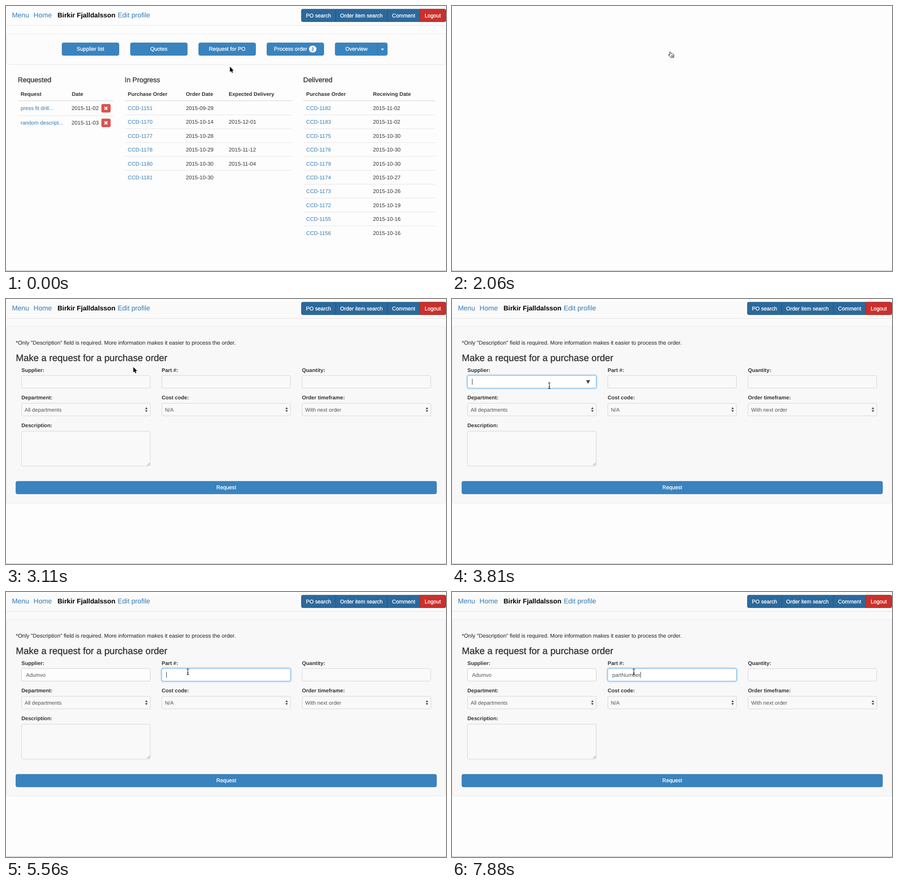
Write an HTML page that moves like this. It is 963 px wide and 581 px high and loops after 8 s.

```html
<!DOCTYPE html>
<html lang="en">
<head>
<meta charset="utf-8">
<title>Purchase order request</title>
<style>
  html, body { margin: 0; width: 100%; height: 100%; overflow: hidden; background: #fdfdfd; }
  svg { display: block; width: 100%; height: 100%; }
  text { font: 11.65px "Liberation Sans", Arial, sans-serif; fill: #333; text-rendering: geometricPrecision; white-space: pre; }
  .link { fill: #337ab7; }
  .date { font-size: 11.8px; }
  .nav { font-size: 15px; }
  .user { font-size: 14.6px; font-weight: bold; fill: #000; }
  .bold { font-size: 11.55px; font-weight: bold; }
  .head { font-size: 15.15px; stroke: #333; stroke-width: .35px; }
  .title { font-size: 20.5px; stroke: #333; stroke-width: .4px; }
  .note { font-size: 12.05px; stroke: #333; stroke-width: .1px; }
  .btn { fill: #fff; stroke: #fff; stroke-width: .3px; text-anchor: middle; }
  .badge { font-size: 10px; font-weight: bold; fill: #337ab7; text-anchor: middle; }
  .value { fill: #555; }
  .option { font-size: 10.9px; fill: #000; }
</style>
</head>
<body>
<svg viewBox="0 0 963 581" stroke-width=".83">
  <defs>
    <filter id="blur" x="-10%" y="-60%" width="120%" height="220%"><feGaussianBlur stdDeviation="1.8"/></filter>
  </defs>
  <rect width="963" height="581" fill="#fdfdfd"/>
  <g id="formBack">
    <rect y="6" width="963" height="441" fill="#fafafa"/>
  </g>
  <g id="nav"></g>
  <g id="home"></g>
  <g id="form"></g>
  <path d="M0 580.5H963" stroke="#b3b3b3" stroke-width="1"/>
  <g id="pointer">
    <path id="arrow" d="M0 0V11.7L2.7 9.2L4.6 13.5L6.6 12.6L4.8 8.4H8.4Z" fill="#000" stroke="#fff" stroke-width="1" paint-order="stroke"/>
    <path id="hand" d="M-1.2 .8Q0 -.8 1 .8L2.2 4.5Q3.3 3.6 4.2 4.6Q5.4 3.9 6.1 5.1Q7.5 4.8 7.8 6.2L8.2 9L7.4 12.8H1.4L-1.6 9.2Q-4.4 7.2 -3.9 6.3Q-2.8 5.4 -.8 7.2ZM2.7 8V11M4.5 8V11M6.2 8V11" fill="#fff" stroke="#000" stroke-width=".9" stroke-linejoin="round"/>
    <path id="beam" d="M-2.7 -6.2H-1Q0 -6 0 -5Q0 -6 1 -6.2H2.7M0 -5V5M-2.7 6.2H-1Q0 6 0 5Q0 6 1 6.2H2.7M-1.6 2H1.6" fill="none" stroke="#111" stroke-width="1.1"/>
  </g>
</svg>
<script>
const $ = id => document.getElementById(id);
const text = (x, y, s, cls = '', id = '') => `<text x="${x}" y="${y}" class="${cls}" id="${id}">${s}</text>`;
const rect = (x, y, w, h, fill, stroke = 'none', r = 0, more = '') =>
  `<rect x="${x}" y="${y}" width="${w}" height="${h}" rx="${r}" fill="${fill}" stroke="${stroke}" ${more}/>`;
const path = (d, fill, stroke = 'none', width = .83) => `<path d="${d}" fill="${fill}" stroke="${stroke}" stroke-width="${width}"/>`;
const rule = (x, y, w, width = .83) => path(`M${x} ${y}h${w}`, 'none', '#ddd', width);
const button = (x, y, w, label, cx = x + w / 2, fill = '#3983bf', edge = '#2e6da4') =>
  rect(x + .4, y + .4, w - .8, 27.5, fill, edge, 3.2) + text(cx, y + 18, label, 'btn');

function navBar() {
  return text(13, 24.5, 'Menu', 'nav link') + text(60.3, 24.5, 'Home', 'nav link') +
    text(112.8, 24.5, 'Birkir Fjalldalsson', 'user') + text(244.5, 24.5, 'Edit profile', 'nav link') +
    rule(0, 42.5, 963) +
    rect(646.5, 6.9, 316, 27.5, '#2c699c', '#204d74', 3.2) +
    path('M906 6.9H959.4Q962.6 6.9 962.6 10.1V31.2Q962.6 34.4 959.4 34.4H906Z', '#cb302c', '#ac2925') +
    path('M721.5 7V34.4M834.5 7V34.4', 'none', '#204d74') +
    text(684, 24.7, 'PO search', 'btn') + text(777.8, 24.7, 'Order item search', 'btn') +
    text(870.3, 24.7, 'Comment', 'btn') + text(934, 24.7, 'Logout', 'btn');
}

function table(x, width, title, columns, rows) {
  let out = text(x, 167, title, 'head') + rule(x, 207.8, width, 1.6);
  columns.forEach(([cx, label]) => out += text(cx, 196.5, label, 'bold'));
  rows.forEach((row, i) => {
    const y = 227.9 + i * 30.4;
    if (i) out += rule(x, y - 19.6, width);
    row.forEach((cell, c) => out += text(columns[c][0], y, cell, c ? 'date' : 'link'));
  });
  return out;
}

function removeButton(y) {
  return rect(209.2, y - 8.6, 19.2, 17.7, '#d9534f', '#d43f3a', 2.3) +
    path(`M215.6 ${y - 2.9}l6.2 6.2m0 -6.2l-6.2 6.2`, 'none', '#fff', 2.5);
}

function homePage() {
  const order = (n, ...dates) => ['CCD-' + n, ...dates.map(d => '2015-' + d)];
  const requests = [['press fit drill...', '02', 224], ['random descript...', '03', 256]];
  const ring = (width, opacity) => rect(421.2, 80, 125.6, 29, 'none', '#69acf3', 4,
    `stroke-width="${width}" opacity="${opacity}"`);
  return rect(1.4, 60.6, 961, 67.8, '#fcfcfc', '#e6e6e6', 3.5) +
    button(122.3, 80.4, 125.3, 'Supplier list') + button(271.9, 80.4, 125.3, 'Quotes') +
    button(421.4, 80.4, 125.3, 'Request for PO') +
    `<g id="buttonHover">${button(421.4, 80.4, 125.3, 'Request for PO', 484, '#286397', '#204d74')}</g>` +
    `<g id="buttonRing">${ring(4, .4)}${ring(2.2, .9)}</g>` +
    button(570.6, 80.4, 125.3, 'Process order', 623) +
    rect(663, 87, 16.5, 15, '#fff', 'none', 7.5) + text(671.2, 98.2, '2', 'badge') +
    button(720, 80.4, 114.8, 'Overview', 767) +
    path('M813.5 80.8V108.3', 'none', '#2e6da4') + path('M820.5 93.5h7l-3.5 3.7z', '#fff') +
    text(26, 167, 'Requested', 'head') + text(32, 196.5, 'Request', 'bold') + text(144, 196.5, 'Date', 'bold') +
    rule(26, 207.8, 209, 1.6) + rule(26, 240.4, 209) +
    requests.map(([name, day, y]) => text(32, y + 3.9, name, 'link') +
      text(143.5, y + 3.9, '2015-11-' + day, 'date') + removeButton(y)).join('') +
    table(260, 366, 'In Progress', [[266.5, 'Purchase Order'], [393.7, 'Order Date'], [487.5, 'Expected Delivery']], [
      order(1151, '09-29'), order(1170, '10-14', '12-01'), order(1177, '10-28'),
      order(1178, '10-29', '11-12'), order(1180, '10-30', '11-04'), order(1181, '10-30')]) +
    table(650.5, 288, 'Delivered', [[657, 'Purchase Order'], [803.3, 'Receiving Date']], [
      order(1182, '11-02'), order(1183, '11-02'), order(1175, '10-30'), order(1176, '10-30'), order(1179, '10-30'),
      order(1174, '10-27'), order(1173, '10-26'), order(1172, '10-19'), order(1155, '10-16'), order(1156, '10-16')]);
}

const field = (x, y, h = 27.5) => rect(x + .4, y + .4, 281.7, h, '#f9f9f9', '#ccc', 3.2);
const select = (x, label, value) => text(x, 220, label, 'bold') + field(x, 228.3) + text(x + 7, 246.5, value, 'value') +
  path(`M${x + 270.7} 241.2h5.6l-2.8 -4zm0 2.6h5.6l-2.8 4z`, '#444');

// An editable field with its focus glow, typed value and caret
const liveField = (name, x) => field(x, 167.4) +
  rect(x + .4, 167.8, 281.7, 27.5, '#fdfdfd', '#ccc', 3.2, `id="${name}White"`) +
  `<g id="${name}Glow">${rect(x + .4, 167.8, 281.7, 27.5, 'none', '#8fc5f0', 3.2, 'stroke-width="3" filter="url(#blur)"')}` +
  `${rect(x + .4, 167.8, 281.7, 27.5, '#fff', '#66afe9', 3.2)}</g>` +
  text(x + 10.3, 185.7, '', 'value', name + 'Value') +
  `<rect id="${name}Caret" y="175" width="1" height="13" fill="#333"/>`;

function formPage() {
  const options = ['Adumvo', 'AKEV Printing', 'Aritov Electronics', 'Adumvo', 'AKEV Printing'];
  const baselines = [211.4, 231.2, 250.9, 271.5, 291.3];
  return rect(1.4, 60.6, 961, 386.8, '#f8f8f8', '#e6e6e6', 3.5) +
    text(21.5, 99.5, '*Only "Description" field is required. More information makes it easier to process the order.', 'note') +
    text(21.5, 135.7, 'Make a request for a purchase order', 'title') +
    text(33.7, 159.5, 'Supplier:', 'bold') + text(340.7, 159.5, 'Part #:', 'bold') + text(647.8, 159.5, 'Quantity:', 'bold') +
    liveField('supplier', 33.5) + liveField('part', 340.5) + field(647.6, 167.4) +
    `<g id="listArrow">${path('M293.4 178h9l-4.5 8z', '#444')}</g>` +
    select(33.7, 'Department:', 'All departments') + select(340.7, 'Cost code:', 'N/A') +
    select(647.8, 'Order timeframe:', 'With next order') +
    text(33.7, 281, 'Description:', 'bold') + field(33.5, 289.4, 76.5) +
    path('M308.5 365l6 -6m-2.8 6l2.8 -2.8', 'none', '#777', .9) +
    button(21.3, 399.4, 921.3, 'Request') +
    `<g id="list">${rect(33.5, 195.5, 282.5, 101, '#fff', '#8db9e2')}${rect(34, 196, 281.5, 20, '#b1d6fe', 'none', 0, 'id="highlight"')}` +
    rule(34, 256.5, 281.5) + options.map((s, i) => text(37, baselines[i], s, 'option')).join('') + '</g>';
}

$('nav').innerHTML = navBar();
$('home').innerHTML = homePage();
$('form').innerHTML = formPage();

// Pointer moves: start, end, number of jumps, way points
const moves = [
  [50, 50, 1, [490, 133], [486, 127]],
  [200, 620, 7, [486, 127], [486, 114], [477.5, 100.3]],
  [2570, 3340, 12, [477.5, 100.3], [466, 113], [400, 128], [300, 146], [236, 156], [213, 182]],
  [3400, 3810, 7, [213, 182], [213, 190]],
  [3860, 4090, 5, [213, 190], [215, 208]],
  [4630, 5040, 8, [215, 208], [240, 207], [325, 203], [398, 175]]
];

function along(points, p) {
  const s = p * (points.length - 1), i = Math.min(Math.floor(s), points.length - 2), f = s - i;
  return points[i].map((v, k) => v + (points[i + 1][k] - v) * f);
}

function pointerAt(t) {
  const move = moves.filter(m => t >= m[0]).pop();
  if (!move) return moves[0][3];
  const [from, to, jumps, ...points] = move;
  const jump = to > from ? Math.min(jumps, 1 + Math.floor((t - from) / (to - from) * (jumps - 1) + 1e-6)) : 1;
  return along(points, jump / jumps);
}

const show = (id, on) => $(id).setAttribute('visibility', on ? 'inherit' : 'hidden');
const between = (t, a, b) => t >= a && t < b;
const ramp = (t, start, span) => Math.max(0, Math.min(1, (t - start) / span));
const inside = (x, y, left, top, right, bottom) => x >= left && x <= right && y >= top && y <= bottom;
const keyTimes = [6460, 6520, 6580, 6750, 7050, 7230, 7410, 7650, 7820, 7880];

function setField(name, x, value, caret) {
  const node = $(name + 'Value');
  if (node.textContent !== value) node.textContent = value;
  show(name + 'Caret', caret);
  $(name + 'Caret').setAttribute('x', x + 10.3 + (value ? node.getComputedTextLength() : 0));
}

function draw(t) {
  const home = t < 2060, form = t >= 2300;
  show('home', home);
  show('form', form);
  show('formBack', form);
  show('nav', home || form);

  const [x, y] = pointerAt(t);
  const overButton = inside(x, y, 422, 81, 547, 108);
  const overField = inside(x, y, 34, 168, 316, 196) || inside(x, y, 341, 168, 623, 196);
  const shape = t < 2570 ? (overButton ? 'hand' : 'arrow') : (overField ? 'beam' : 'arrow');
  ['arrow', 'hand', 'beam'].forEach(s => show(s, s === shape));
  $('pointer').setAttribute('transform', `translate(${x} ${y})`);
  show('buttonHover', home && overButton);
  show('buttonRing', home && t >= 1640);

  const listOpen = between(t, 3970, 4570);
  show('list', form && listOpen);
  show('highlight', form && listOpen && y > 196);
  show('listArrow', form && between(t, 3400, 5450));
  show('supplierWhite', form && t >= 3400);
  show('partWhite', form && t >= 5450);
  const partFocus = ramp(t, 5400, 150);
  $('supplierGlow').setAttribute('opacity', t < 5450 ? ramp(t, 3350, 150) * (t >= 3400) : 1 - partFocus);
  $('partGlow').setAttribute('opacity', t < 5450 ? 0 : partFocus);

  setField('supplier', 33.5, t < 3970 ? '' : t < 4570 ? 'a' : 'Adumvo',
    between(t, 3400, 4510) || between(t, 4570, 5040));
  setField('part', 340.5, 'partNumber'.slice(0, keyTimes.filter(k => t >= k).length),
    between(t, 5450, 6100) || t >= 6460);
}

const start = performance.now();
function tick() {
  draw((performance.now() - start) % 8000);
  requestAnimationFrame(tick);
}
tick();
</script>
</body>
</html>
```
